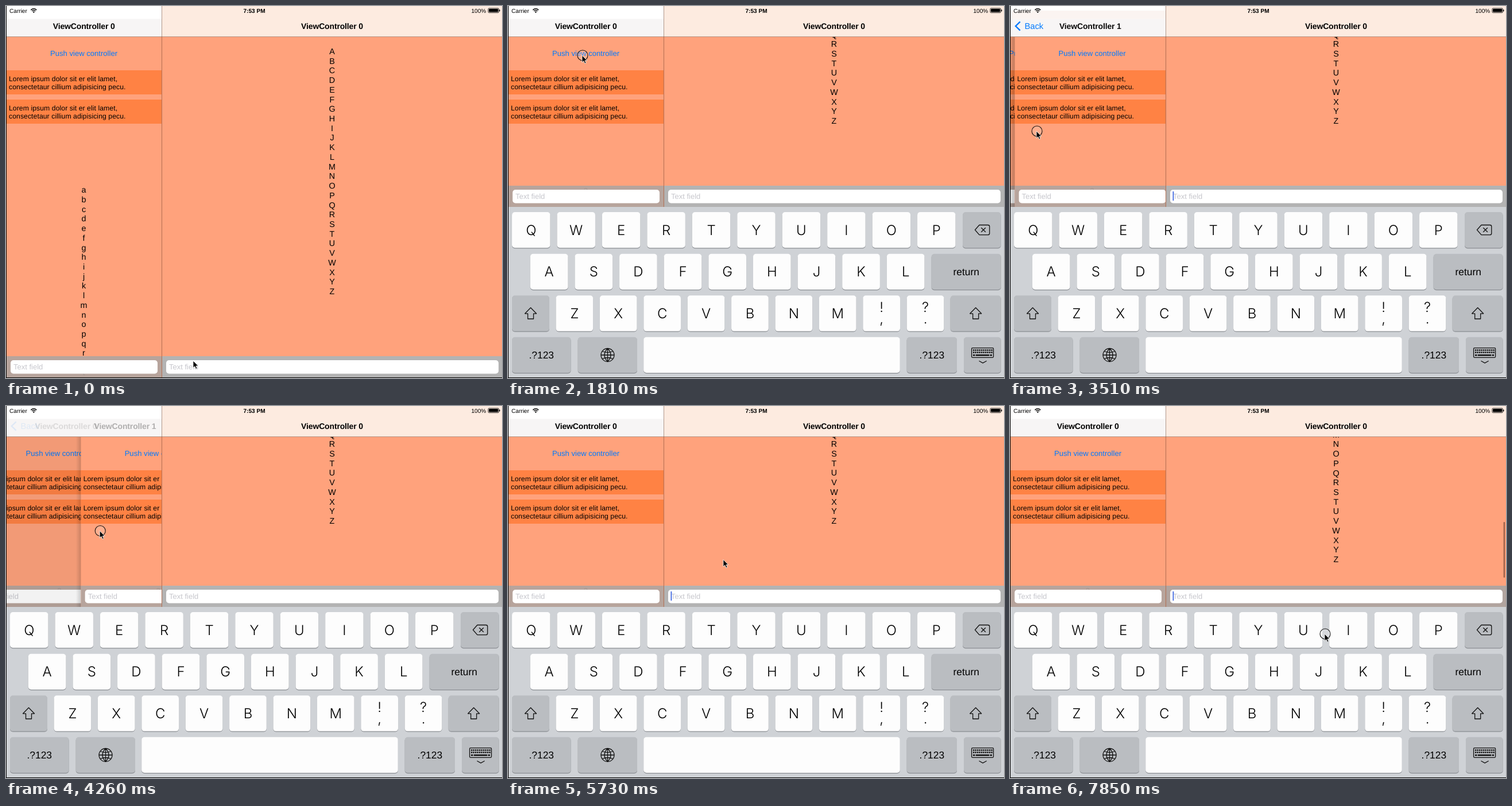
These frames come from a looping animation (864x648 px, 8000 ms). An HTML page:

```html
<!DOCTYPE html>
<html lang="en">
<head>
<meta charset="utf-8">
<title>Split view with keyboard</title>
<style>
html, body { margin: 0; width: 100%; height: 100%; overflow: hidden; background: #000; }
svg { display: block; width: 864px; height: 648px; }
text { font-family: "Liberation Sans", Arial, sans-serif; text-rendering: geometricPrecision; }
.mid { text-anchor: middle; }
.title { font-size: 14px; font-weight: bold; letter-spacing: -.15px; text-anchor: middle; }
.status { font-size: 10.1px; }
.link { font-size: 13.08px; fill: #007aff; }
.lorem { font-size: 12.2px; letter-spacing: .08px; }
.list { font-size: 14.34px; text-anchor: middle; }
.hint { font-size: 13px; fill: #c7c7cd; }
.cap { font-family: Inter, "Liberation Sans", sans-serif; font-weight: 300; font-size: 24px; text-anchor: middle; }
.word { font-size: 17.4px; text-anchor: middle; }
.icon { fill: none; stroke: #111; stroke-width: 1.3; stroke-linejoin: round; }
</style>
</head>
<body>
<svg id="stage" viewBox="0 0 864 648"></svg>
<script>
const LOOP = 8000, PANE = 271, RISE = 297, ROW = 16.72;
const SALMON = '#ffa27c', BLUE = '#007aff';
const stage = document.getElementById('stage');

function add(parent, tag, attrs = {}, text) {
  const node = document.createElementNS('http://www.w3.org/2000/svg', tag);
  for (const name in attrs) node.setAttribute(name, attrs[name]);
  if (text !== undefined) node.textContent = text;
  parent.appendChild(node);
  return node;
}
const group = (parent, attrs) => add(parent, 'g', attrs);
const rect = (parent, x, y, width, height, fill, rx = 0) =>
  add(parent, 'rect', { x, y, width, height, fill, rx });
const label = (parent, x, y, cls, text) => add(parent, 'text', { x, y, class: cls }, text);
const path = (parent, d, attrs = { class: 'icon' }) => add(parent, 'path', { d, ...attrs });
const move = (node, x, y) => node.setAttribute('transform', `translate(${x} ${y})`);
const fade = (node, v) => node.setAttribute('opacity', Math.max(0, Math.min(1, v)));
const show = (node, on) => node.setAttribute('display', on ? 'inline' : 'none');

const defs = add(stage, 'defs');
function clip(id, x, y, w, h) {
  rect(add(defs, 'clipPath', { id }), x, y, w, h);
  return `url(#${id})`;
}
const shade = add(defs, 'linearGradient', { id: 'shade' });
add(shade, 'stop', { offset: 0, 'stop-opacity': 0 });
add(shade, 'stop', { offset: 1, 'stop-opacity': .16 });

function letters(parent, x, y, first) {
  for (let i = 0; i < 26; i++)
    label(parent, x, y + i * ROW, 'list', String.fromCharCode(first.charCodeAt(0) + i));
}

function inputBar(parent, x, w, fill, opacity) {
  const g = group(parent);
  const back = rect(g, x, 610, w, 38, fill);
  back.setAttribute('opacity', opacity);
  rect(g, x + 7, 617, w - 14, 23.5, '#fff', 5);
  label(g, x + 12, 632.5, 'hint', 'Text field');
  return { g, back };
}

// Left column page, used for both pages of the navigation stack
function page(parent) {
  const g = group(parent);
  const shadow = rect(g, -8, 53, 9, 595, 'url(#shade)');
  rect(g, 1, 53, 270, 595, SALMON);
  label(g, 77, 87, 'link', 'Push view controller');
  for (const y of [112, 163]) {
    rect(g, 1, y, 270, 42, '#ff8244');
    label(g, 5, y + 19, 'lorem', 'Lorem ipsum dolor sit er elit lamet,');
    label(g, 5, y + 33.4, 'lorem', 'consectetaur cillium adipisicing pecu.');
  }
  letters(g, 135.5, 325.2, 'a');
  const bar = inputBar(g, 1, 270, '#b1a49f', .92).g;
  const dim = rect(g, 1, 53, 270, 595, '#000');
  fade(dim, 0);
  return { g, bar, dim, shadow };
}

// Right column
const right = group(stage, { 'clip-path': clip('rightClip', 271, 53, 593, 595) });
rect(right, 271, 53, 593, 595, SALMON);
const list = group(right);
letters(list, 568, 84, 'A');
const scroller = rect(right, 859.7, 0, 2.4, 97, 'rgba(60,30,20,.5)', 1.2);
const rightBar = inputBar(right, 272, 593, '#b3b3b3', 1);
const caret = rect(rightBar.g, 283.5, 620, 1.8, 16, '#4169e1');

// Left column
const left = group(stage, { 'clip-path': clip('leftClip', 0, 0, PANE, 648) });
const under = page(left), over = page(left);

// Navigation bars
rect(left, 0, 0, PANE, 54, '#f7f5f5');
rect(left, 0, 0, PANE, 22.5, '#fff');
const tint = rect(left, 0, 8, PANE, 14.5, '#fbf4f1');
const title0 = label(left, 135.7, 39.7, 'title', 'ViewController 0');
const title1 = label(left, 135.7, 39.7, 'title', 'ViewController 1');
const back = group(left);
path(back, 'M17.6 27.3L9.8 35L17.6 42.7', { fill: 'none', stroke: BLUE, 'stroke-width': 2.4 });
add(back, 'text', { x: 25.5, y: 40, fill: BLUE, 'font-size': 14.7 }, 'Back');
rect(stage, 271, 0, 593, 54, '#fdebe0');
label(stage, 568, 39.7, 'title', 'ViewController 0');
rect(stage, 0, 53, 864, 1, '#b59483');
rect(stage, 271, 0, 1, 648, 'rgba(70,40,25,.42)');

// Status bar
label(stage, 6, 12, 'status', 'Carrier');
label(stage, 432.5, 12, 'status mid', '7:53 PM').setAttribute('font-weight', 'bold');
label(stage, 810.5, 12, 'status', '100%');
path(stage, 'M43.3 6.9Q48.3 2.5 53.3 6.9M45.1 8.8Q48.3 6 51.5 8.8', { fill: 'none', stroke: '#000', 'stroke-width': 1.4 });
path(stage, 'M46.5 10.2Q48.3 8.7 50.1 10.2L48.3 12Z', { fill: '#000' });
add(stage, 'rect', { x: 839.9, y: 3.9, width: 18.6, height: 7.8, rx: 1.6, fill: 'none', stroke: '#000', 'stroke-width': .8 });
rect(stage, 841.1, 5, 16.2, 5.6, '#000', .8);
rect(stage, 859.2, 6.2, 1.3, 3.2, '#000', .6);

// Keyboard, laid out at its raised position
const board = group(stage);
rect(board, 0, 350, 864, 298, '#cfd2d6');
function key(x, y, w, dark) {
  rect(board, x, y + 1, w, 62.5, '#8b8e93', 5);
  rect(board, x, y, w, 62.3, dark ? '#babdc1' : '#fdfdfd', 5);
}
function keyRow(chars, x, y, step, w) {
  [...chars].forEach((c, i) => {
    const kx = x + i * step, mid = kx + w / 2;
    key(kx, y, w);
    if (c === '!' || c === '?') {
      label(board, mid, y + 29, 'cap', c);
      label(board, mid, y + 49, 'cap', c === '!' ? ',' : '.');
    } else label(board, mid, y + 39.7, 'cap', c);
  });
}
function wordKey(x, y, w, text) {
  key(x, y, w, true);
  label(board, x + w / 2, y + 37, 'word', text);
}
function shiftKey(x, w) {
  key(x, 504.3, w, true);
  const m = x + w / 2;
  path(board, `M${m} 525.5l10 10.3h-5v9.2h-10v-9.2h-5Z`);
}
keyRow('QWERTYUIOP', 7, 359, 78.45, 66.5);
key(792, 359, 66.5, true);
path(board, 'M813.5 390L821 381.5H836Q838.8 381.5 838.8 384V396Q838.8 398.7 836 398.7H821ZM824.3 386.2l7.6 7.6m0-7.6l-7.6 7.6');
keyRow('ASDFGHJKL', 38.8, 431.7, 77.63, 65.7);
wordKey(737.7, 431.7, 121, 'return');
shiftKey(7, 65);
keyRow('ZXCVBNM!?', 83.5, 504.3, 76.4, 64.7);
shiftKey(770.7, 88);
wordKey(7, 576.7, 102.5, '.?123');
key(121.7, 576.7, 103.3, true);
path(board, 'M162 608a11.5 11.5 0 0 1 23 0a11.5 11.5 0 0 1-23 0ZH185M173.5 596.5V619.5M173.5 596.5q-11 11.5 0 23q11-11.5 0-23M164.5 601.5q9 4 18 0M164.5 614.5q9-4 18 0')
  .setAttribute('stroke-width', 1);
key(236.2, 576.7, 446.6);
wordKey(694.7, 576.7, 87.3, '.?123');
key(794, 576.7, 64.7, true);
add(board, 'rect', { x: 807.6, y: 595.7, width: 38, height: 16.6, rx: 1.5, class: 'icon' });
for (const y of [599.5, 603.5])
  path(board, `M810 ${y}H844`, { stroke: '#111', 'stroke-width': 2.4, 'stroke-dasharray': '2.4 1.1' });
path(board, 'M810 608.3h3.5m1.3 0h23.5m1.3 0h3.5', { stroke: '#111', 'stroke-width': 2.4 });
path(board, 'M820.5 618.3l6.6 3.6l6.6-3.6');

// Pointer
const pointer = group(stage);
const ring = add(pointer, 'circle', { cx: 1, cy: 0, r: 9, fill: 'rgba(255,255,255,.15)', stroke: '#111', 'stroke-width': 1.1 });
path(pointer, 'M0 0V12.3L2.9 9.7L4.9 14.2L7 13.2L5 8.9H8.8Z', { fill: '#000', stroke: '#fff', 'stroke-width': .8 });

rect(stage, 0, 0, 1, 648, '#000');
rect(stage, 0, 647, 864, 1, '#000');

const ticks = [[0, 0, 1], [240, 240, 1], [530, 530, 1], [790, 1570, 6], [1690, 2650, 9],
  [2800, 3510, 6], [3660, 3810, 2], [3960, 4960, 8], [5080, 6090, 7],
  [6210, 6790, 6], [6940, 7200, 3], [7320, 7850, 4]]
  .flatMap(([a, b, n]) => Array.from({ length: n }, (_, i) => n > 1 ? a + (b - a) * i / (n - 1) : a));

// Motion tables: time, value(s)
const rise = [[0, 0], [240, 90], [530, 282.6], [790, RISE]];
const slide = [[1930, 271], [2050, 215], [2170, 105], [2290, 38], [2410, 8], [2530, 0],
  [3370, 0], [3510, 7.5], [4820, 225], [4960, 256], [5080, 268], [5200, 271]];
const pull = [[6560, 0], [6790, 7], [7200, 49], [7500, 62], [7850, 67]];
const hand = [[0, 326, 618], [240, 325, 622], [530, 322, 598], [790, 312, 570], [1570, 129, 86],
  [2050, 129, 86], [3230, 37, 217], [3370, 39, 218], [3510, 46, 218], [4960, 277, 217],
  [5200, 285, 220], [6090, 493, 330], [6400, 544, 328], [6560, 544, 328],
  [6790, 544, 335], [7200, 546, 377], [7500, 547, 392], [7850, 548, 397]];
const touches = [[240, 400], [1690, 1990], [3230, 5000], [6400, LOOP]];

function at(keys, t, col = 1) {
  const i = keys.findIndex(k => k[0] > t);
  if (i === 0) return keys[0][col];
  if (i < 0) return keys[keys.length - 1][col];
  const a = keys[i - 1], b = keys[i];
  return a[col] + (b[col] - a[col]) * (t - a[0]) / (b[0] - a[0]);
}

function draw(t) {
  const up = at(rise, t), x = at(slide, t), p = x / PANE;
  const scroll = up - at(pull, t);

  move(board, 0, RISE - up);
  move(rightBar.g, 0, -up);
  for (const v of [under, over]) move(v.bar, 0, -up);
  move(list, 0, -scroll);
  show(scroller, t >= 6560);
  scroller.setAttribute('y', 212 - (290 - scroll) / 6);
  rightBar.back.setAttribute('fill', t >= 7200 ? '#b1a49f' : '#b3b3b3');

  show(over.g, x < PANE);
  move(over.g, x, 0);
  move(under.g, -.3 * (PANE - x), 0);
  fade(under.dim, .1 * (1 - p));
  show(over.shadow, x > 0);
  move(title0, -60 * (1 - p), 0);
  fade(title0, p < .1 ? 0 : p * p * p);
  move(title1, 150 * p, 0);
  fade(title1, 1 - 1.5 * p);
  fade(back, 1.05 - 2 * p);
  show(tint, t >= 2050 && t < 3660);

  const blink = t / 1050 % 1;
  show(caret, t >= 240 && blink > .12 && blink < .65);
  move(pointer, at(hand, t, 1), at(hand, t, 2));
  show(ring, touches.some(([a, b]) => t >= a && t < b));
}

const start = performance.now();
function frame() {
  const now = (performance.now() - start) % LOOP;
  draw(ticks.filter(t => t <= now).pop() || 0);
  requestAnimationFrame(frame);
}
frame();
</script>
</body>
</html>
```
